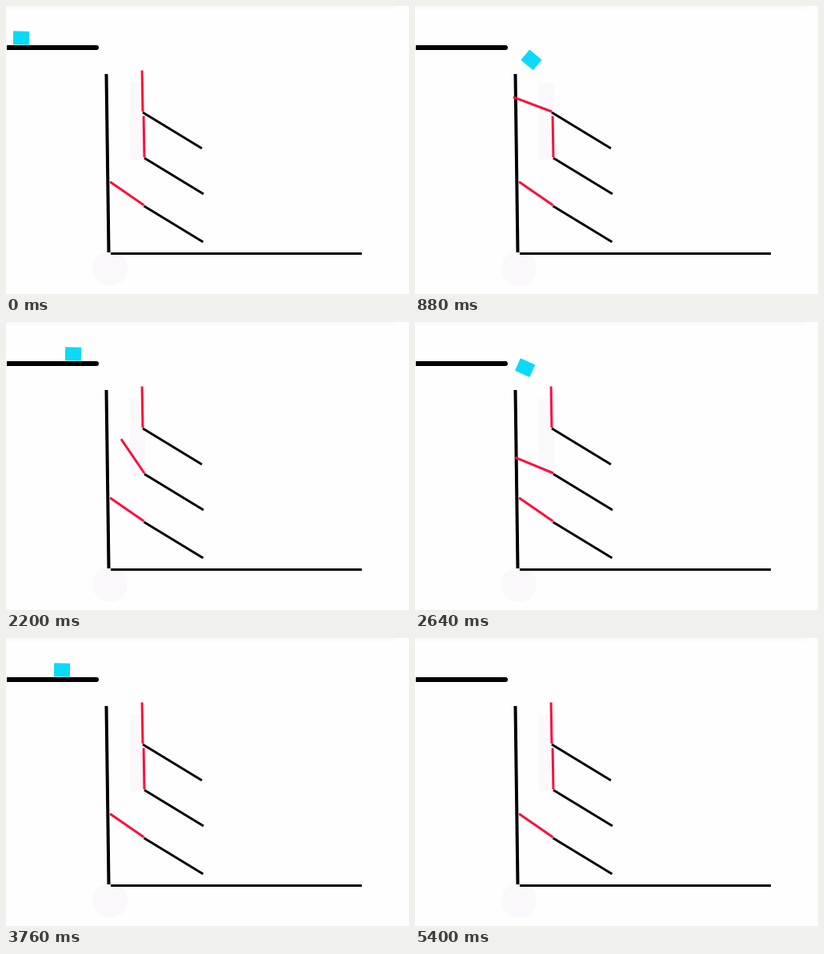
An HTML page with a canvas for the animation above (5.56 s loop, 504 by 360 pixels).

```html
<!DOCTYPE html>
<html lang="en">
<head>
<meta charset="utf-8">
<title>Sorting ramps</title>
<style>
  html, body { margin: 0; width: 100%; height: 100%; overflow: hidden; background: #fefefe; }
  canvas { display: block; }
</style>
</head>
<body>
<canvas id="stage" width="504" height="360"></canvas>
<script>
const ctx = document.getElementById('stage').getContext('2d');
const LOOP = 5560, STEP = 40;
const BLACK = '#000', RED = '#fb103c', CYAN = '#0adaf7', SMUDGE = '#fbf8fc';
const RAD = Math.PI / 180;

const BLOCK_W = 20, BLOCK_H = 17, PLATFORM_Y = 40;
const EDGE_X = 98, PUSH_TIME = 80;        // final shove off the platform
const GRAVITY = 0.0019, SLIDE = 0.00046;  // half accelerations, px per ms squared
const RUN_IN = 30, RUN_OUT = 78;          // travel before and after the hinge
const TUMBLE = 42 * RAD;                  // tilt against the gate on landing
const GATE_LENGTH = 51.5, RAMP_DX = 74, RAMP_DY = 45;
const RAMP_SLOPE = Math.atan2(RAMP_DY, RAMP_DX);

// The mechanism stands still for `length` ms at these moments.
const pauses = [
  { at: 480, length: 80 }, { at: 640, length: 120 }, { at: 880, length: 80 },
  { at: 1040, length: 120 }, { at: 1680, length: 80 }, { at: 2320, length: 40 },
  { at: 3480, length: 80 }, { at: 3760, length: 200 }, { at: 4240, length: 120 },
  { at: 4560, length: 200 }, { at: 5040, length: 120 }
];

// One ramp and one block per run; all times count motion without pauses.
const runs = [
  { x: 171, y: 133, lean: 69.4, opens: [240, 560], closes: [1240, 1440],
    enter: 0, arrive: 480, from: 19, wait: 74, edge: 560, slide: 760 },
  { x: 173, y: 190, lean: 67.5, opens: [1600, 1840], closes: [2760, 2960],
    enter: 1440, arrive: 1720, from: 26, wait: 84, edge: 2025, slide: 2287 },
  { x: 172.5, y: 250, lean: 55.4, opens: [-1, 0], closes: [LOOP, LOOP + 1],
    enter: 2960, arrive: 3160, from: 32, wait: 70, edge: 3245, slide: 3640 }
];

const lerp = (a, b, k) => a + (b - a) * k;
const progress = (t, [a, b]) => Math.min(1, Math.max(0, (t - a) / (b - a)));

function motionTime(t) {
  return pauses.reduce((u, p) => u - Math.min(p.length, Math.max(0, t - p.at)), t);
}

// Pose of a block that has travelled `d` px along the gate and ramp.
function poseOnSlope(run, d) {
  const gateSlope = (90 - run.lean) * RAD;
  const past = d - RUN_IN;
  const slope = past < 0 ? gateSlope : RAMP_SLOPE;
  const tilt = TUMBLE * Math.max(0, 1 - d / RUN_IN);
  const lift = 1.5 + (BLOCK_H * Math.cos(tilt) + BLOCK_W * Math.sin(tilt)) / 2;
  return {
    x: run.x + past * Math.cos(slope) + lift * Math.sin(slope),
    y: run.y + past * Math.sin(slope) - lift * Math.cos(slope),
    angle: slope + tilt
  };
}

function blockPose(run, u) {
  if (u < run.edge) {
    const x = lerp(run.from, run.wait, progress(u, [run.enter, run.arrive]));
    const push = progress(u, [run.edge - PUSH_TIME, run.edge]);
    return { x: lerp(x, EDGE_X, push), y: PLATFORM_Y, angle: 0.02 };
  }
  if (u >= run.slide) return poseOnSlope(run, SLIDE * (u - run.slide) ** 2);

  const land = poseOnSlope(run, 0);
  const fallTime = Math.sqrt((land.y - PLATFORM_Y) / GRAVITY);
  const k = Math.min(1, (u - run.edge) / fallTime);
  return {
    x: lerp(EDGE_X, land.x, 1 - (1 - k) ** 3),
    y: lerp(PLATFORM_Y, land.y, k * k),
    angle: land.angle * k
  };
}

function line(x1, y1, x2, y2, width = 3, color = BLACK, cap = 'butt') {
  ctx.strokeStyle = color;
  ctx.lineWidth = width;
  ctx.lineCap = cap;
  ctx.beginPath();
  ctx.moveTo(x1, y1);
  ctx.lineTo(x2, y2);
  ctx.stroke();
}

function drawBackground() {
  ctx.fillStyle = '#fefefe';
  ctx.fillRect(0, 0, 504, 360);
  ctx.fillStyle = '#fbfbfb';
  ctx.fillRect(0, 0, 488, 4);
  ctx.fillStyle = SMUDGE;
  ctx.fillRect(155, 96, 19, 96);
  ctx.beginPath();
  ctx.arc(130, 328, 22, 0, Math.PI * 2);
  ctx.fill();
}

function drawBlock(run, u) {
  const gone = run.slide + Math.sqrt((RUN_IN + RUN_OUT) / SLIDE);
  if (u < run.enter || u >= gone) return;
  const { x, y, angle } = blockPose(run, u);
  ctx.save();
  ctx.translate(x, y);
  ctx.rotate(angle);
  ctx.fillStyle = CYAN;
  ctx.fillRect(-BLOCK_W / 2, -BLOCK_H / 2, BLOCK_W, BLOCK_H);
  ctx.restore();
}

function drawGate({ x, y, lean, opens, closes }, u) {
  const open = progress(u, opens) - progress(u, closes);
  const angle = lerp(1, lean, open) * RAD;
  const hinge = y - 1;
  line(x, hinge, x - GATE_LENGTH * Math.sin(angle), hinge - GATE_LENGTH * Math.cos(angle), 3, RED);
}

function drawFrame() {
  line(1, 52, 8, 52, 6);
  line(6, 52, 113, 52, 6, BLACK, 'round');
  line(125.5, 85, 128.5, 308, 4);
  line(131, 309.5, 445, 309.5);
}

function render(now) {
  const t = Math.floor((now % LOOP) / STEP) * STEP;
  const u = motionTime(t);
  drawBackground();
  runs.forEach(run => drawBlock(run, u));
  drawFrame();
  for (const run of runs) {
    drawGate(run, u);
    line(run.x, run.y, run.x + RAMP_DX, run.y + RAMP_DY);
  }
}

let start;
function tick(now) {
  start ??= now;
  render(now - start);
  requestAnimationFrame(tick);
}
render(0);
requestAnimationFrame(tick);
</script>
</body>
</html>
```
